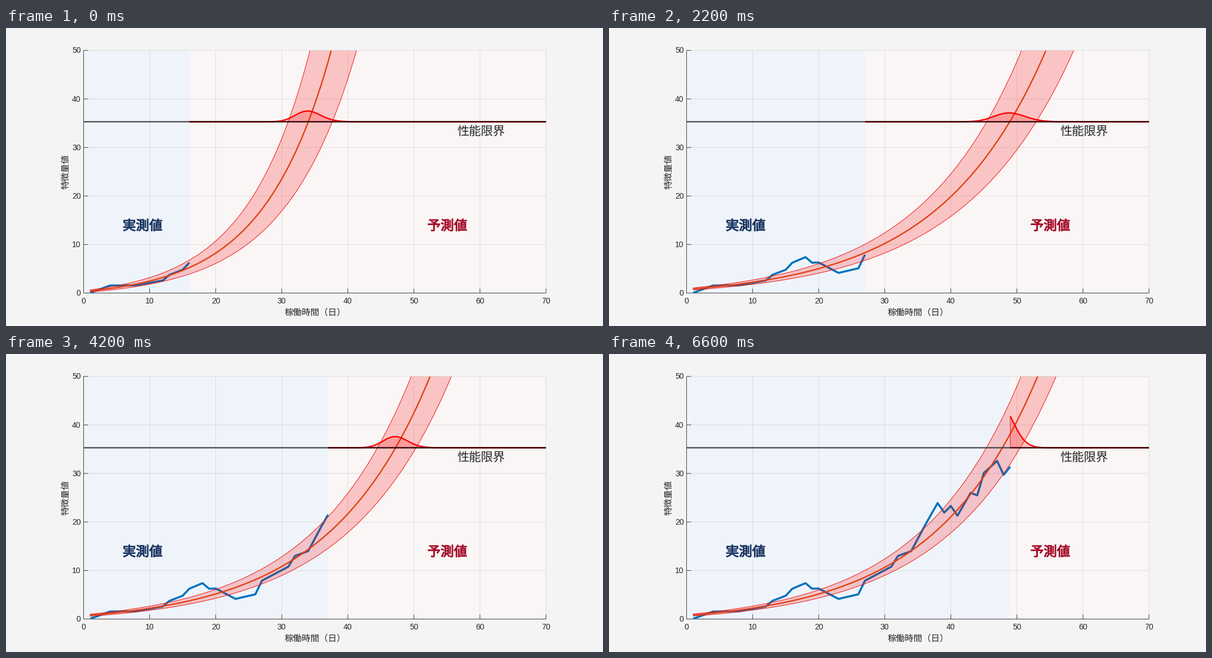
Write a matplotlib script that moves like this. It is 1058x529 px and loops after 6800 ms.

```python
import math

import matplotlib.pyplot as plt
import numpy as np
from matplotlib.animation import FuncAnimation
from matplotlib.patheffects import withStroke

WIDTH, HEIGHT, DPI = 1058, 529, 100
PX = 72 / DPI
LEFT, RIGHT, TOP, BOTTOM = 137.5, 957, 39.8, 470.5
X_MAX, Y_MAX = 70, 50
LIMIT, OFFSET = 35.3, -1
FIRST_DAY, LAST_DAY = 16, 49
NOISE = 0.1 * LIMIT / (LIMIT - OFFSET)
START_SD = 0.215
INK, AXIS, GRID = "#262626", "#404040", (0, 0, 0, 0.1)
SANS, JAPANESE = "Liberation Sans", "Noto Sans CJK JP"

days = np.arange(1, X_MAX + 1)

# Turning points of the measured value; days in between lie on straight lines.
TURNS = {1: 0.05, 4: 1.55, 8: 1.6, 12: 2.6, 13: 3.75, 15: 4.8, 16: 6.25,
         18: 7.4, 19: 6.25, 20: 6.3, 23: 4.15, 26: 5.1, 27: 7.9, 31: 10.8,
         32: 13, 34: 14, 36: 19.1, 38: 23.9, 39: 21.95, 40: 23.3, 41: 21.3,
         43: 26, 44: 25.5, 45: 30.1, 47: 32.6, 48: 29.7, 49: 31.4}
observed = np.interp(days[:LAST_DAY], list(TURNS), list(TURNS.values()))


def fit(day):
    """Exponential growth fitted to the days so far: start, rate and rate error."""
    elapsed = days[:day] - 1
    rate, log_start = np.polyfit(elapsed, np.log(observed[:day] - OFFSET), 1)
    return math.exp(log_start), rate, NOISE / (elapsed.std() * math.sqrt(day))


def growth(start, rate):
    return OFFSET + start * np.exp(rate * (days - 1))


def failure_density(day, start, rate, rate_sd):
    """Log-normal density of the day the limit is reached, for the days ahead."""
    median = 1 + math.log((LIMIT - OFFSET) / start) / rate
    lever = (median - (day + 1) / 2) * rate_sd / NOISE
    spread = 1.12 * NOISE / rate * math.sqrt(1 + 1 / day + lever ** 2) / median
    ahead = math.erfc(math.log(day / median) / spread / math.sqrt(2)) / 2
    t = np.arange(day, X_MAX + 0.5, 0.5)
    bell = np.exp(-(np.log(t / median) / spread) ** 2 / 2)
    bell /= t * spread * math.sqrt(2 * math.pi)
    return t, LIMIT + 10.7 * bell / ahead ** 0.9


fig = plt.figure(figsize=(WIDTH / DPI, HEIGHT / DPI), dpi=DPI, facecolor="#f4f4f4")
ax = fig.add_axes([LEFT / WIDTH, 1 - BOTTOM / HEIGHT,
                   (RIGHT - LEFT) / WIDTH, (BOTTOM - TOP) / HEIGHT])
ax.set(xlim=(0, X_MAX), ylim=(0, Y_MAX), facecolor="#faf6f5")
ax.tick_params(left=False, bottom=False, labelleft=False, labelbottom=False)
ax.spines[:].set_visible(False)


def label(x, y, text, size, color=INK, font=JAPANESE, bold=0, **kwargs):
    style = dict(ha="center", va="center", family=font, color=color)
    style.update(kwargs)
    item = fig.text(x / WIDTH, 1 - y / HEIGHT, text, fontsize=size * PX, **style)
    if bold:
        item.set_path_effects([withStroke(linewidth=bold * PX, foreground=color)])


def line(color, width, z, xs=(), ys=(), **kwargs):
    return ax.plot(xs, ys, color=color, lw=width * PX, zorder=z, snap=False,
                   solid_capstyle="butt", **kwargs)[0]


def rule(color, z, xs, ys):
    line(color, 1, z, xs, ys, clip_on=False)


def area(z):
    return ax.fill([0, 0, 0], [0, 0, 0], facecolor=(1, 0, 0, 0.2),
                   edgecolor="#f01818", lw=PX, zorder=z)[0]


x_scale = (RIGHT - LEFT) / X_MAX
y_scale = (BOTTOM - TOP) / Y_MAX
for x in range(0, X_MAX + 1, 10):
    rule(GRID, 2, [x, x], [0, Y_MAX])
    rule(AXIS, 3, [x, x], [0, 8 / y_scale])
    label(LEFT + x * x_scale, 489.2, str(x), 14, font=SANS, va="baseline")
for y in range(0, Y_MAX + 1, 10):
    rule(GRID, 2, [0, X_MAX], [y, y])
    rule(AXIS, 3, [0, 8 / x_scale], [y, y])
    label(132.5, BOTTOM - y * y_scale + 4.6, str(y), 14, font=SANS,
          ha="right", va="baseline")
rule(AXIS, 3, [0, 0], [0, Y_MAX])
rule(AXIS, 3, [0, X_MAX], [0, 0])

label(493, 504.8, "稼働時間（日）", 15.5, ha="left", weight="light")
label(106.3, 254.5, "特徴量値", 15.5, rotation=90, weight="light")
label(841.5, 184.8, "性能限界", 21.3, weight="light")
label(242, 352, "実測値", 23.5, "#1f3864", bold=1.2)
label(782, 352, "予測値", 23.5, "#a5102c", bold=1.2)

past = ax.axvspan(0, FIRST_DAY, facecolor="#eff4fb", lw=0, zorder=1)
measured = line("#0072bd", 3.6, 4, solid_joinstyle="round")
forecast = line("#d95319", 2.4, 5)
band = area(6)
bell_area = area(7)
bell_curve = line("#ff0000", 2.4, 8)
limit_past = line("#3f4246", 2.2, 9)
limit_ahead = line("#330508", 2.4, 9)


def outline(xs, top, bottom):
    return np.column_stack([np.r_[xs, xs[::-1]], np.r_[top, bottom[::-1]]])


def draw(frame):
    day = FIRST_DAY + frame
    start, rate, rate_sd = fit(day)
    upper = growth(start + START_SD, rate + rate_sd)
    lower = growth(start - START_SD, rate - rate_sd)
    t, density = failure_density(day, start, rate, rate_sd)

    past.set_width(day)
    measured.set_data(days[:day], observed[:day])
    forecast.set_data(days, growth(start, rate))
    band.set_xy(outline(days, upper, lower))
    bell_curve.set_data(t, density)
    bell_area.set_xy(outline(t, density, np.full_like(t, LIMIT)))
    limit_past.set_data([0, day], [LIMIT, LIMIT])
    limit_ahead.set_data([day, X_MAX], [LIMIT, LIMIT])
    return past, measured, forecast, band, bell_area, bell_curve, limit_past, limit_ahead


animation = FuncAnimation(fig, draw, frames=LAST_DAY - FIRST_DAY + 1,
                          interval=200, repeat=True, repeat_delay=0)
plt.show()
```
